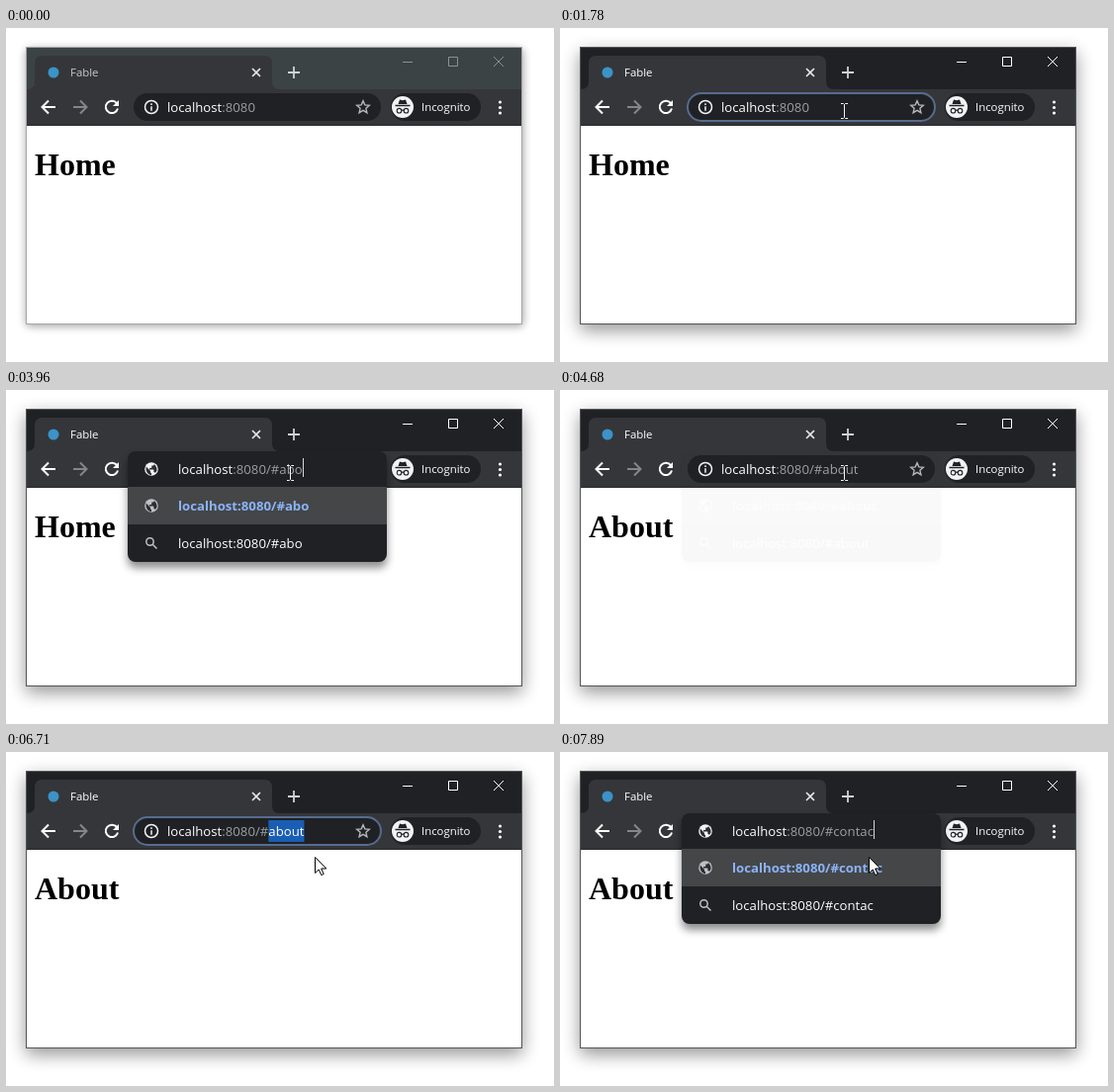
An HTML page for the animation above (8 s loop, 554 by 338 pixels).

```html
<!DOCTYPE html>
<html lang="en">
<head>
<meta charset="utf-8">
<title>Hash routing</title>
<style>
html, body { margin: 0; width: 100%; height: 100%; overflow: hidden; background: #fff; }
svg { display: block; width: 554px; height: 338px; }
text { font: 13.2px "Open Sans", "Noto Sans", sans-serif; fill: #fff; white-space: pre; }
.dim { fill: #9aa0a6; }
.hot { fill: #8ab4f8; font-weight: 700; }
.small { font-size: 11.4px; }
.page { font: bold 32px "Liberation Serif", serif; fill: #000; }
.bar { fill: #202124; }
.frame { fill: none; stroke: #545556; }
.ctl { stroke: #fff; fill: none; }
.idle .bar { fill: #3c4345; }
.idle .frame { stroke: #a4a6a7; }
.idle .ctl { stroke: #8b9193; }
.idle .tab { fill: #c6c9cb; }
</style>
</head>
<body>
<svg id="stage" viewBox="0 0 554 338">
  <defs>
    <filter id="soft" x="-20%" y="-20%" width="140%" height="150%"><feGaussianBlur stdDeviation="4"/></filter>
    <filter id="wide" x="-20%" y="-20%" width="140%" height="150%"><feGaussianBlur stdDeviation="9"/></filter>
    <g id="back" fill="none" stroke="currentColor" stroke-width="2"><path d="M7 0H-6M0-6.5L-6.5 0 0 6.5"/></g>
    <g id="reload">
      <path d="M5-3.8A6.2 6.2 0 1 0 6 1.5" fill="none" stroke="currentColor" stroke-width="2"/>
      <path d="M7-7V-1H1z" fill="currentColor"/>
    </g>
    <g id="info" fill="none" stroke="currentColor" stroke-width="1.5"><circle r="6.5"/><path d="M0-.8V3.8M0-3.7V-2.1"/></g>
    <g id="star" fill="none" stroke="currentColor" stroke-width="1.4">
      <path d="M0-6.3L1.8-2.1 6.3-1.7 2.9 1.3 3.9 5.7 0 3.4-3.9 5.7-2.9 1.3-6.3-1.7-1.8-2.1z"/>
    </g>
    <g id="search" fill="none" stroke="currentColor" stroke-width="1.5"><circle cx="-1.5" cy="-1.5" r="3.7"/><path d="M1.2 1.2L5.5 5.5"/></g>
    <g id="globe">
      <circle r="6.8" fill="currentColor"/>
      <path fill="#2c2d30" d="M-5.2-2.5L-1 2v1q0 1 1 1v2.2Q-5 5.5-5.5 0zM-2-1h1.5q.8 0 .8-.8V-3.4H1.6q1.2 0 1.2-1.6Q6-2 5.5 1.5L4 4Q3.6 3 2.4 3V1Q2.4.4 1.8.4H-2z"/>
    </g>
    <circle id="fav" r="5.5" fill="#3b93c8"/>
  </defs>

  <rect id="shade0" x="20" y="21" width="503" height="281" rx="4" opacity=".36" filter="url(#soft)"/>
  <rect id="shade1" x="20" y="25" width="502" height="281" filter="url(#wide)"/>
  <rect x="21" y="19" width="500" height="281" fill="#fff"/>
  <rect class="bar" x="21" y="19" width="500" height="44"/>
  <path fill="#35363a" d="M21 62q8 0 8-8V36q0-8 8-8H261q8 0 8 8V54q0 8 8 8H521V98H21z"/>
  <path d="M21 98.5H521" stroke="#27282b"/>
  <rect class="frame" x="20.5" y="19.5" width="501" height="280"/>

  <use href="#fav" x="48" y="45"/>
  <text class="small tab" x="65" y="49">Fable</text>
  <path d="M249 41l8 8m0-8l-8 8" stroke="#e4e6e8" stroke-width="1.6"/>
  <path d="M285 45h12m-6-6v12" stroke="#cfd1d3" stroke-width="1.8"/>
  <path class="ctl" d="M401 34.5h10M447.5 29.5h9v9h-9zM493 29l10 10m0-10l-10 10"/>
  <use href="#back" x="43" y="80" color="#fff"/>
  <use href="#back" transform="translate(75 80) scale(-1 1)" color="#85868a"/>
  <use href="#reload" x="107" y="80" color="#fff"/>
  <rect x="389" y="66" width="91" height="28" rx="14" fill="#202124"/>
  <circle cx="401" cy="80" r="11" fill="#f1f3f4"/>
  <path d="M396.5 77l1.5-4.5 3 .8 3-.8 1.5 4.5zM393.5 77.8h15v1.4h-15z" fill="#202124"/>
  <path d="M399.8 83.5q1.2-.8 2.4 0M395.2 83.7a2.3 2.3 0 1 0 4.6 0a2.3 2.3 0 1 0-4.6 0M402.2 83.7a2.3 2.3 0 1 0 4.6 0a2.3 2.3 0 1 0-4.6 0" fill="none" stroke="#202124" stroke-width="1.1"/>
  <text class="small" x="420" y="84">Incognito</text>
  <g fill="#fff"><circle cx="499.5" cy="75" r="1.6"/><circle cx="499.5" cy="80.5" r="1.6"/><circle cx="499.5" cy="86" r="1.6"/></g>
  <text id="page" class="page" x="29" y="149"></text>

  <rect id="pill" x="129" y="66" width="250" height="28" rx="14" fill="#202124" stroke="#566c8f" stroke-width="2"/>
  <g id="drop">
    <rect id="dropShade" x="123" y="68" width="262" rx="8" opacity=".45" filter="url(#soft)"/>
    <rect id="dropBox" x="123" y="62" width="262" rx="8" fill="#202124"/>
    <rect x="123" y="98" width="262" height="38" fill="#454648"/>
    <use id="icon1" x="147" y="117" color="#bdc1c6"/>
    <use id="icon2" x="147" y="155" color="#bdc1c6"/>
    <text id="row1" x="174" y="122"></text>
    <text id="row2" x="174" y="160"></text>
  </g>
  <use id="lead" x="147" y="80" color="#f1f3f4"/>
  <use id="mark" href="#star" x="361" y="80" color="#b4b8bc"/>
  <rect id="sel" y="69" height="22" fill="#1a5db4"/>
  <text id="url" y="85"></text>
  <rect id="caret" y="69" width="1" height="19" fill="#d5d7d9"/>

  <circle id="press" r="12" fill="#fff000"/>
  <path id="beam" d="M-3.5-7.5H-1L0-6.5 1-7.5H3.5M0-6.5V6.5M-3.5 7.5H-1L0 6.5 1 7.5H3.5" fill="none" stroke="#f4f4f4"/>
  <path id="arrow" d="M.5.5V16.5L4.2 13 6.8 18.6 9.2 17.5 6.7 12H11.8z" fill="#fff" stroke="#000"/>
</svg>
<script>
const $ = id => document.getElementById(id);
const set = (id, attrs) => { for (const k in attrs) $(id).setAttribute(k, attrs[k]); };
const show = (id, on) => set(id, { visibility: on ? 'visible' : 'hidden' });
const clamp = v => Math.max(0, Math.min(1, v));

const LOOP = 8000, FOCUS = 640;
// [time, value] steps
const typed = [[0, ''], [2270, '/'], [2730, '/#'], [3250, '/#a'], [3500, '/#ab'], [3960, '/#abo'],
  [4240, '/#abou'], [4320, '/#about'], [7250, '/#c'], [7300, '/#co'], [7510, '/#con'],
  [7610, '/#cont'], [7710, '/#conta'], [7890, '/#contac']];
const dropAlpha = [[0, 0], [2270, .1], [2300, .36], [2320, .64], [2340, 1], [4600, .65], [4625, .36],
  [4650, .15], [4680, .025], [5220, 0], [7250, .4], [7275, .7], [7300, 1]];
// index of the first selected character, -1 for none
const selFrom = [[0, -1], [830, 0], [1250, -1], [6330, 0], [6420, 16], [7250, -1]];
const caretOn = [[0, 0], [FOCUS, 1], [830, 0], [1250, 1], [1780, 0], [2270, 1], [4600, 0],
  [6260, 1], [6330, 0], [7250, 1]];
const focused = [[0, 0], [FOCUS, 1], [4600, 0], [6260, 1]];
const presses = [[FOCUS, 830], [1250, 1480], [6260, 6320], [6400, 6460]];
const path = [[150, 352, 335], [600, 271, 84], [980, 271, 84], [1240, 287, 84], [5220, 287, 84],
  [5260, 282, 78], [5330, 296, 102], [5480, 296, 102], [5720, 291, 82], [6500, 291, 82], [6710, 312, 106]];

const at = (steps, t) => steps.reduce((v, s) => t >= s[0] ? s[1] : v, steps[0][1]);

function pointer(t) {
  const i = path.findIndex(p => p[0] > t);
  if (i < 0) return path.at(-1).slice(1);
  if (!i) return path[0].slice(1);
  const [a, b] = [path[i - 1], path[i]], u = (t - a[0]) / (b[0] - a[0]), e = u * u * (3 - 2 * u);
  return [a[1] + (b[1] - a[1]) * e, a[2] + (b[2] - a[2]) * e];
}

const span = (cls, s, dx = 0) => `<tspan class="${cls}" dx="${dx}">${s}</tspan>`;
const suffix = span('dim', ' - ', 2) + span('dim', 'Pondle Se...', 2);

function suggestions(tail) {
  const url = 'localhost:8080' + tail;
  if (tail === '/') return [
    ['fav', 'Fable' + span('dim', ' - ', 1) + span('hot', 'localhost:8080', 2)], ['search', url + suffix]];
  if (tail === '/#') return [['search', url + suffix], ['globe', span('hot', url)]];
  return [['globe', span('hot', url)], ['search', url]];
}

function drawBox(t) {
  const tail = at(typed, t), alpha = at(dropAlpha, t), sel = at(selFrom, t);
  const open = t >= 2270 && t < 4600 || t >= 7250;
  const x = open ? 174 : 163, rest = ':8080' + tail;
  const cut = sel < 0 ? rest.length : Math.max(0, sel - 9);
  $('url').innerHTML = 'localhost' + span('dim', rest.slice(0, cut)) + rest.slice(cut);
  set('url', { x });
  const width = $('url').getComputedTextLength();
  const from = sel > 0 ? $('url').getSubStringLength(0, sel) : 0;
  show('sel', sel >= 0);
  set('sel', { x: x + from, width: Math.max(0, width - from) });
  show('caret', at(caretOn, t));
  set('caret', { x: Math.round(x + width) });

  const rows = suggestions(tail);
  rows.forEach(([icon, html], i) => {
    set('icon' + (i + 1), { href: '#' + icon });
    $('row' + (i + 1)).innerHTML = html;
  });
  const height = tail === '/#c' ? 188 : 112;
  set('dropBox', { height });
  set('dropShade', { height });
  set('drop', { opacity: alpha });
  set('lead', { href: '#' + (open ? rows[0][0] : 'info') });
  show('mark', !open);
  set('pill', { 'stroke-opacity': at(focused, t) && !open ? 1 : 0 });
}

function drawPointer(t) {
  const [x, y] = pointer(t), inBox = y < 96;
  const place = { transform: `translate(${Math.round(x)} ${Math.round(y)})` };
  show('beam', inBox);
  show('arrow', !inBox && t >= 150);
  set('beam', { transform: `translate(${Math.round(x) + .5} ${Math.round(y)})` });
  set('arrow', place);
  const glow = Math.max(...presses.map(([down, up]) => t < down ? 0 : .5 * clamp(1 - (t - up) / 120)));
  set('press', { cx: x - 2, cy: y, opacity: glow });
}

function draw(t) {
  $('stage').classList.toggle('idle', t < FOCUS);
  const k = clamp((t - FOCUS) / 90);
  set('shade0', { opacity: .36 * (1 - k) });
  set('shade1', { opacity: .42 * k });
  $('page').textContent = t < 4625 ? 'Home' : 'About';
  drawBox(t);
  drawPointer(t);
}

const start = performance.now();
function tick() {
  draw((performance.now() - start) % LOOP);
  requestAnimationFrame(tick);
}
tick();
</script>
</body>
</html>
```
